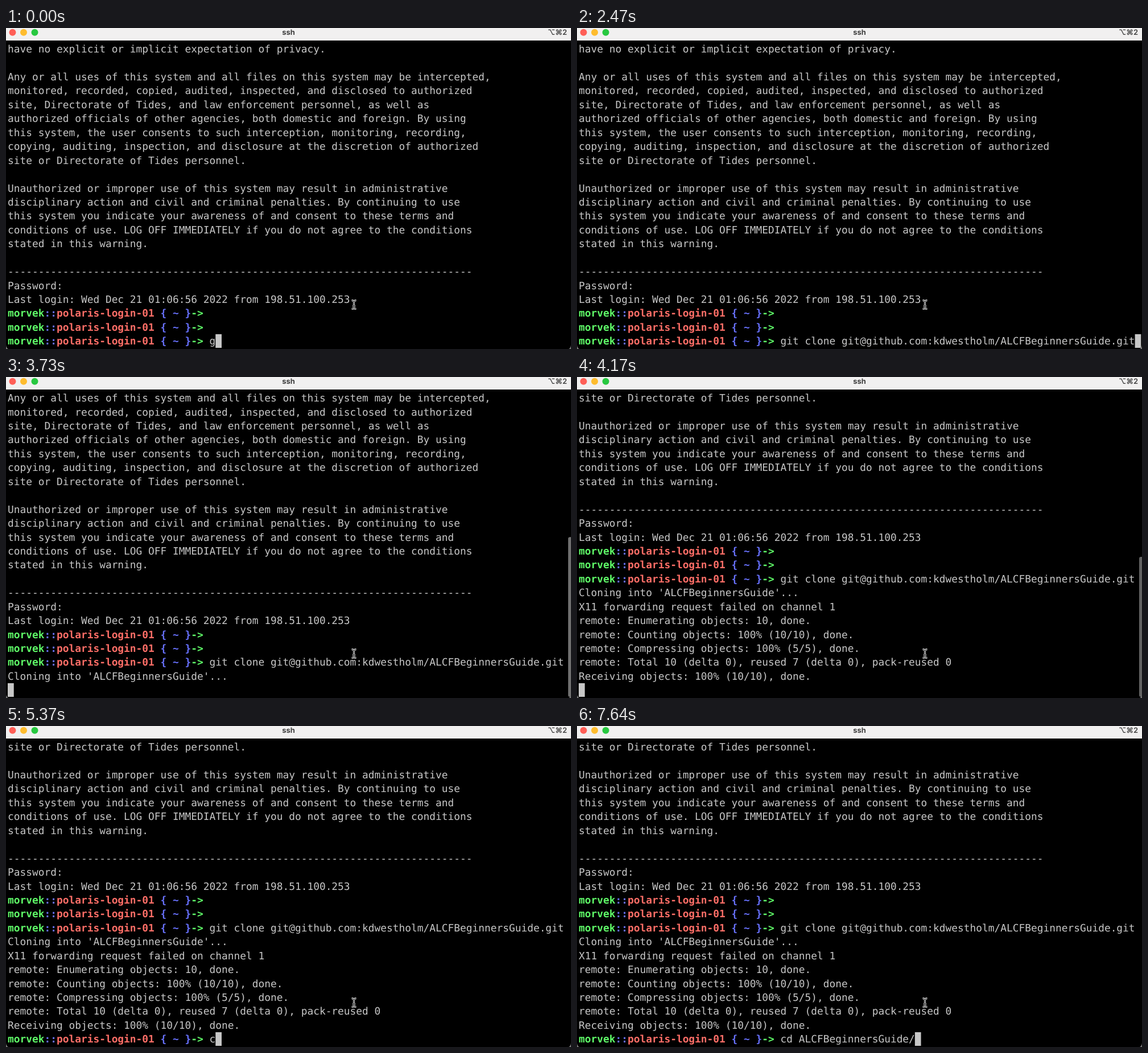
Recreate the animation shown at these times as an HTML page with a canvas. Size 993 by 564 pixels, loop 8000 ms.

```html
<!DOCTYPE html>
<html lang="en">
<head>
<meta charset="utf-8">
<title>ssh</title>
<style>
  html, body { margin: 0; width: 100%; height: 100%; overflow: hidden; background: #000; }
  canvas { display: block; }
</style>
</head>
<body>
<canvas id="stage" width="993" height="564"></canvas>
<script>
const ctx = document.getElementById('stage').getContext('2d');
const LOOP = 8000, ROWS = 22;
const LEFT = 3, TOP = 25, ROW_H = 24.43, BASELINE = 18.2;
const FONT = '17.85px "DejaVu Sans Mono", monospace';
const GREY = '#c7c7c7', GREEN = '#5ffa68', BLUE = '#6871ff', RED = '#ff6e67';
const SCROLLBACK = 18.3; // rows above the first visible one

// A "$" at the start of a line stands for the coloured prompt.
const PROMPT = [['morvek', GREEN], ['::', BLUE], ['polaris-login-01', RED], [' { ~ }', BLUE], ['->', GREEN], [' ', GREY]];

const banner = `have no explicit or implicit expectation of privacy.

Any or all uses of this system and all files on this system may be intercepted,
monitored, recorded, copied, audited, inspected, and disclosed to authorized
site, Directorate of Tides, and law enforcement personnel, as well as
authorized officials of other agencies, both domestic and foreign. By using
this system, the user consents to such interception, monitoring, recording,
copying, auditing, inspection, and disclosure at the discretion of authorized
site or Directorate of Tides personnel.

Unauthorized or improper use of this system may result in administrative
disciplinary action and civil and criminal penalties. By continuing to use
this system you indicate your awareness of and consent to these terms and
conditions of use. LOG OFF IMMEDIATELY if you do not agree to the conditions
stated in this warning.

${'-'.repeat(76)}
Password:
Last login: Wed Dec 21 01:06:56 2022 from 198.51.100.253
$
$`.split('\n');

// Each event replaces the current (last) line; "\n" starts new ones.
const events = [
  [0, '$g'], [50, '$gi'], [290, '$git'], [580, '$gi'], [700, '$git'], [880, '$git '],
  [1170, '$git c'], [1350, '$git cl'], [1530, '$git clo'], [1580, '$git clon'],
  [1760, '$git clone'], [1940, '$git clone '],
  [2470, '$git clone git@github.com:kdwestholm/ALCFBeginnersGuide.git'],
  [3670, '$git clone git@github.com:kdwestholm/ALCFBeginnersGuide.git\n'],
  [3730, "Cloning into 'ALCFBeginnersGuide'...\n"],
  [4090, 'X11 forwarding request failed on channel 1\n'],
  [4150, `remote: Enumerating objects: 10, done.
remote: Counting objects: 100% (10/10), done.
remote: Compressing objects: 100% (5/5), done.
remote: Total 10 (delta 0), reused 7 (delta 0), pack-reused 0
Receiving objects: 100% (10/10), done.
`],
  [4470, '$'], [5370, '$c'], [5430, '$cd'], [5610, '$cd '], [5900, '$cd A'],
  [6140, '$cd AL'], [6200, '$cd ALC'], [6380, '$cd ALCF'], [6920, '$cd ALCFB'],
  [7280, '$cd ALCFBe'], [7640, '$cd ALCFBeginnersGuide/']
];

function linesAt(t) {
  const lines = [...banner, ''];
  for (const [time, text] of events) {
    if (time <= t) lines.splice(-1, 1, ...text.split('\n'));
  }
  return lines;
}

function setFont(font) {
  ctx.font = font;
  ctx.textRendering = 'geometricPrecision';
}

function drawLine(line, y, cell) {
  let x = LEFT;
  const put = (text, color, weight) => {
    setFont(weight + FONT);
    ctx.fillStyle = color;
    ctx.fillText(text, x, y + BASELINE);
    x += cell * text.length;
  };
  if (line[0] === '$') {
    PROMPT.forEach(([text, color]) => put(text, color, 'bold '));
    line = line.slice(1);
  }
  put(line, GREY, '');
  return x;
}

function drawTitleBar() {
  ctx.fillStyle = '#f1f0f0';
  ctx.fillRect(0, 0, 993, 22);
  [['#ff5f57', 11.5], ['#febc2e', 31], ['#28c840', 50.5]].forEach(([color, x]) => {
    ctx.fillStyle = color;
    ctx.beginPath();
    ctx.arc(x, 7.8, 6, 0, 7);
    ctx.fill();
  });
  setFont('bold 13px Inter, sans-serif');
  ctx.fillStyle = '#404040';
  ctx.textAlign = 'center';
  ctx.fillText('ssh', 496.5, 11.5);
  setFont('600 13px Inter, "DejaVu Sans", sans-serif');
  ctx.textAlign = 'right';
  ctx.fillText('⌥⌘2', 986, 11.5);
  ctx.textAlign = 'left';
}

function drawScrollbar(t, rows) {
  const alpha = t < 3670 ? 0 : Math.max(0, Math.min(1, (4385 - t) / 240));
  const height = 540 * ROWS / (SCROLLBACK + rows);
  ctx.fillStyle = `rgba(112,112,112,${alpha})`;
  ctx.beginPath();
  ctx.roundRect(988, 562 - height, 8, height, 3);
  ctx.fill();
}

function drawPointer() {
  const beam = new Path2D('M607.5 478.5Q611.5 478.5 611.5 481.5Q611.5 478.5 615.5 478.5'
    + 'M611.5 481V491M609 488.5H614M607.5 493.5Q611.5 493.5 611.5 490.5Q611.5 493.5 615.5 493.5');
  [['#eee', 3], ['#000', 1]].forEach(([color, width]) => {
    ctx.strokeStyle = color;
    ctx.lineWidth = width;
    ctx.stroke(beam);
  });
}

function draw(t) {
  ctx.fillStyle = '#777';
  ctx.fillRect(0, 0, 993, 564);
  ctx.fillStyle = '#000';
  ctx.beginPath();
  ctx.roundRect(0, 20, 993, 545, [0, 0, 8, 8]);
  ctx.fill();
  drawTitleBar();

  setFont(FONT);
  const cell = ctx.measureText('0'.repeat(100)).width / 100;
  const lines = linesAt(t);
  let cursorX;
  lines.slice(-ROWS).forEach((line, row) => {
    cursorX = drawLine(line, TOP + row * ROW_H, cell);
  });
  ctx.fillStyle = GREY;
  ctx.fillRect(cursorX, 538, cell, 24);

  drawScrollbar(t, lines.length);
  drawPointer();
}

const start = performance.now();
function tick() {
  draw((performance.now() - start) % LOOP);
  requestAnimationFrame(tick);
}
tick();
</script>
</body>
</html>
```
